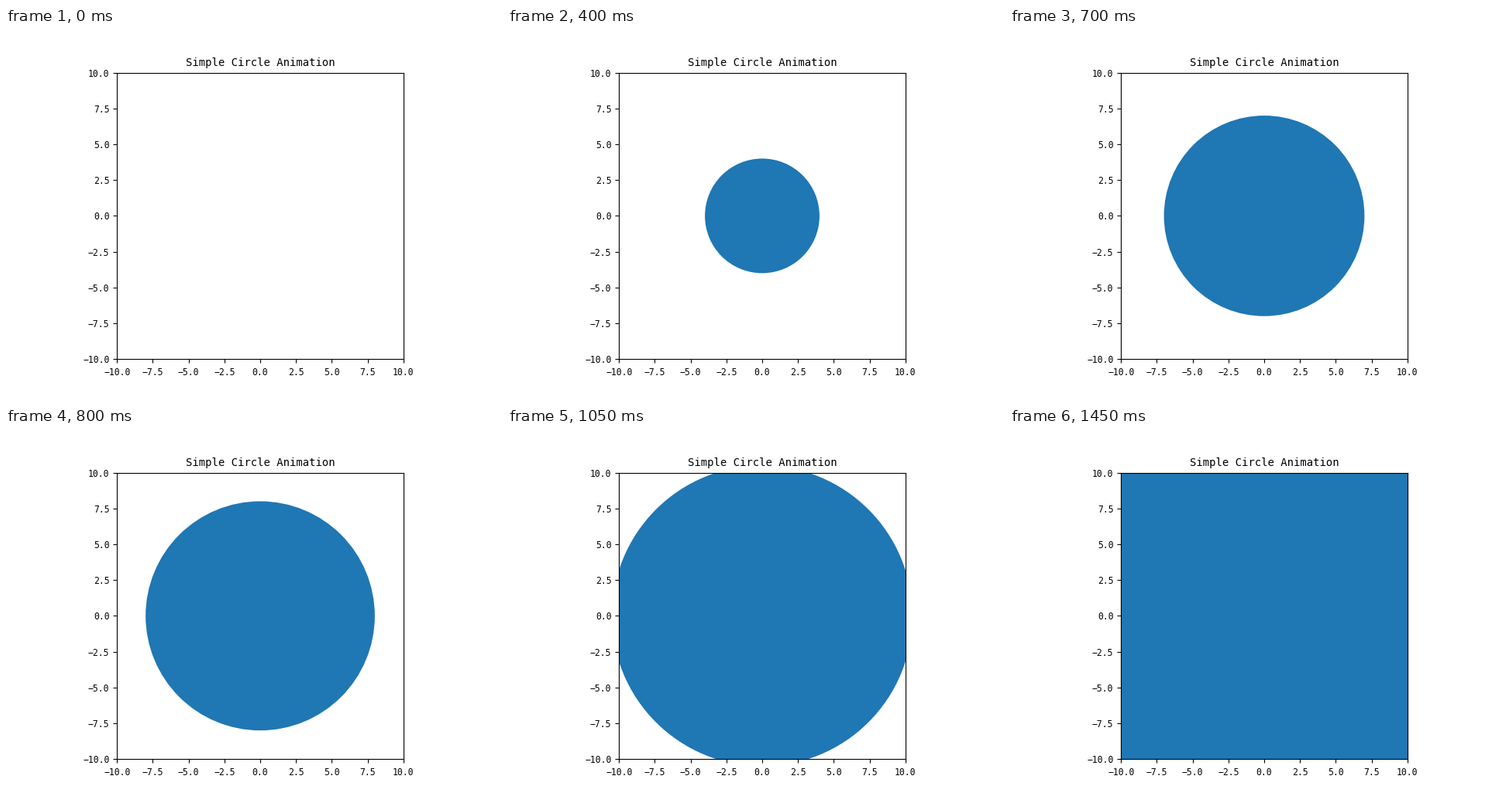
A matplotlib script for the animation above (1.5 s loop, 640 px wide and 480 px high).

```python
import matplotlib.pyplot as plt
from matplotlib.animation import FuncAnimation

FRAMES = 30
INTERVAL = 50
GROWTH = 0.5  # radius gained per frame

plt.rcParams["font.family"] = "DejaVu Sans Mono"

fig, ax = plt.subplots(figsize=(6.4, 4.8), dpi=100)
ax.set_xlim(-10, 10)
ax.set_ylim(-10, 10)
ax.set_aspect("equal")
ax.set_title("Simple Circle Animation", fontsize=10)
ax.tick_params(labelsize=8.3)
ax.tick_params(axis="x", pad=4)

circle = plt.Circle((0, 0), 0, facecolor="#1f77b4", edgecolor="none")
ax.add_patch(circle)


def update(frame):
    circle.set_radius(GROWTH * frame)
    circle.set_visible(frame > 0)
    return (circle,)


anim = FuncAnimation(fig, update, frames=FRAMES, interval=INTERVAL,
                     repeat=True, repeat_delay=0)
plt.show()
```
